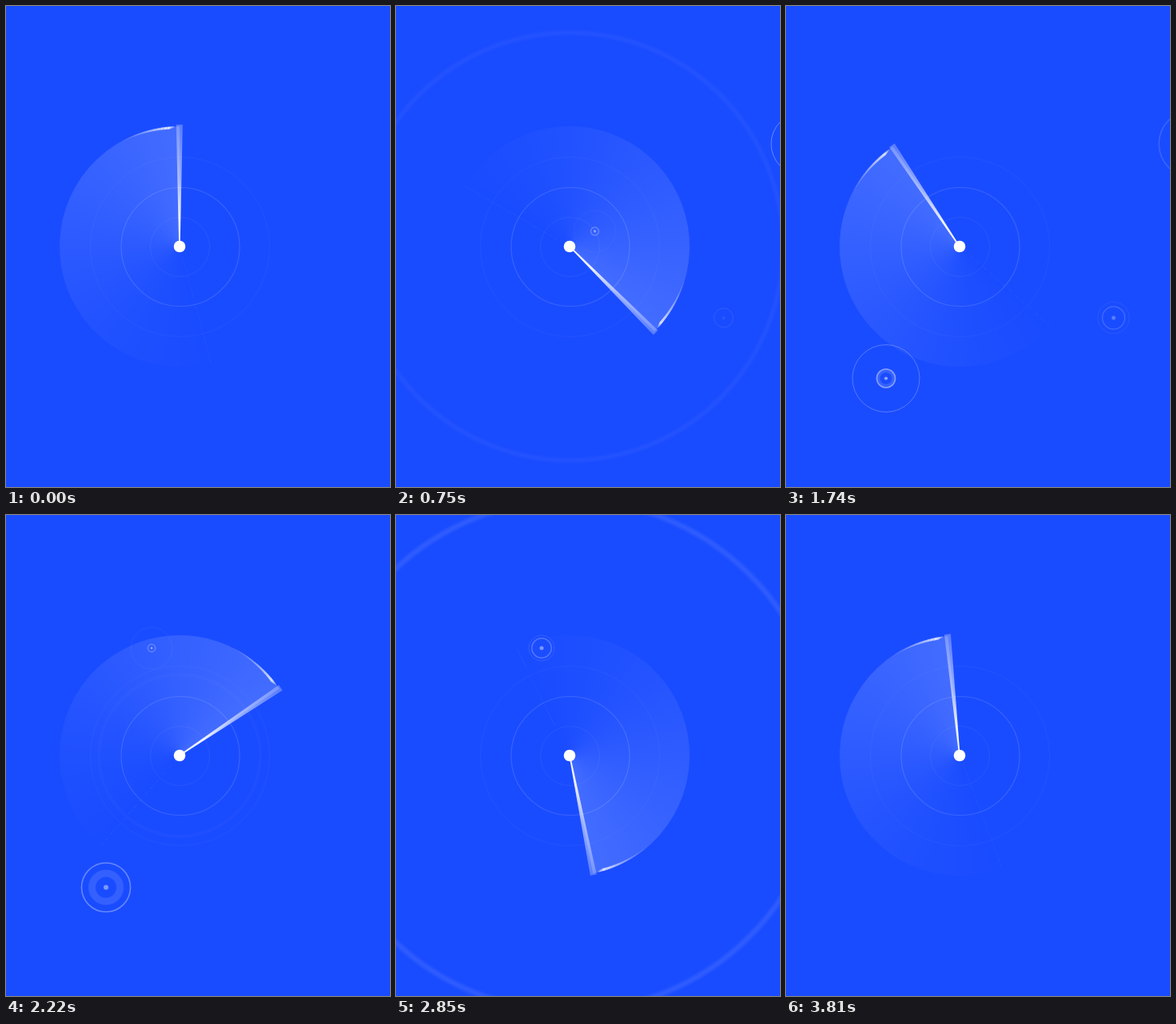
These frames come from a looping animation (480 px wide and 600 px high, 3840 ms). An HTML page with a canvas:

```html
<!DOCTYPE html>
<html lang="en">
<head>
<meta charset="utf-8">
<title>Radar sweep</title>
<style>
html, body { margin: 0; width: 100%; height: 100%; overflow: hidden; background: #1a4cff; }
canvas { display: block; }
</style>
</head>
<body>
<canvas id="stage" width="480" height="600"></canvas>
<script>
const ctx = document.getElementById('stage').getContext('2d');
const LOOP = 3840, TURN = 1920, STEP = 30;
const CX = 217, CY = 300, REACH = 150;
const TAU = Math.PI * 2, DEG = Math.PI / 180;

// Echoes start when the beam passes them; ping = radius, duration, alpha.
const blips = [
  { x: 248.5, y: 281, start: 315, ping: [26, 400, 0.06] },
  { x: 409.5, y: 389, start: 614, ping: [26, 400, 0.16] },
  { x: 508, y: 172, start: 353, ping: [46, 600, 0.33], big: true },
  { x: 125, y: 464.5, start: 1116, ping: [42, 640, 0.36], big: true },
  { x: 182, y: 166, start: 1842, ping: [26, 400, 0.06] }
];

const white = a => `rgba(255,255,255,${Math.max(0, a)})`;
const clamp = v => Math.min(1, Math.max(0, v));
const hump = p => p > 0 && p < 1 ? Math.sin(Math.PI * p) : 0;

function ring(x, y, r, width, alpha) {
  if (r <= 0 || alpha <= 0) return;
  ctx.beginPath();
  ctx.arc(x, y, r, 0, TAU);
  ctx.lineWidth = width;
  ctx.strokeStyle = white(alpha);
  ctx.stroke();
}

function disc(x, y, r, alpha) {
  ctx.beginPath();
  ctx.arc(x, y, r, 0, TAU);
  ctx.fillStyle = white(alpha);
  ctx.fill();
}

// The motion holds for one step twice per loop and catches up later.
function stepTime(ms) {
  const n = Math.floor((ms % LOOP) / STEP);
  const held = (n >= 10 && n < 40) || (n >= 82 && n < 118);
  return (held ? n - 1 : n) * STEP;
}

function drawWave(r, alpha) {
  if (r <= 0 || r > 410) return;
  for (const w of [9, 6, 3]) ring(CX, CY, r, w * (0.4 + r / 500), alpha / 3);
}

function drawWaves(t) {
  drawWave(0.363 * (t + 15), t < 1200 ? 0.035 : 0);
  const r = 0.363 * (t - 1942);
  drawWave(r, 0.025 + 0.065 * clamp((r - 250) / 70));
}

function drawSweep() {
  const span = 195 * DEG;
  const grad = ctx.createConicGradient(-Math.PI / 2 - span, 0, 0);
  const end = span / TAU;
  for (let i = 0; i <= 12; i++) {
    grad.addColorStop(end * i / 12, white(0.18 * Math.pow(i / 12, 1.35)));
  }
  ctx.beginPath();
  ctx.moveTo(0, 0);
  ctx.arc(0, 0, REACH, -Math.PI / 2 - span, -Math.PI / 2);
  ctx.closePath();
  ctx.fillStyle = grad;
  ctx.fill();
}

function drawRim() {
  for (let d = 2.5; d < 33; d += 0.5) {
    const tail = 1 - (d - 2.5) / 30.5;
    const head = clamp((d - 1.5) / 3.5);
    const width = 0.6 + 2.8 * tail * head;
    const a = -Math.PI / 2 - d * DEG;
    ctx.beginPath();
    ctx.arc(0, 0, REACH - width / 2, a - 0.5 * DEG, a);
    ctx.lineWidth = width;
    ctx.strokeStyle = white(head * Math.pow(tail, 1.6));
    ctx.stroke();
  }
}

function drawBeam() {
  const grad = ctx.createLinearGradient(0, 0, 0, -152);
  grad.addColorStop(0, white(1));
  grad.addColorStop(0.25, white(0.9));
  grad.addColorStop(0.55, white(0.55));
  grad.addColorStop(1, white(0.27));
  ctx.beginPath();
  ctx.moveTo(-0.8, 0);
  ctx.lineTo(-4.2, -152);
  ctx.lineTo(3.8, -152);
  ctx.lineTo(0.6, 0);
  ctx.closePath();
  ctx.fillStyle = grad;
  ctx.fill();
}

function drawBlip({ x, y, start, ping, big }, t) {
  const age = t - start;
  if (age <= 0) return;
  const [reach, time, strength] = ping;
  const p = clamp(age / time);
  ring(x, y, reach * (1 - (1 - p) ** 2), 1, strength * hump(age / (time * 1.3)));

  const fade = hump(age / (big ? 1550 : 1350));
  if (!fade) return;
  const inner = 0.0125 * age, outer = 0.025 * (age - 336);
  if (big) {
    ring(x, y, inner * 1.27, 9 * age / 1104, 0.14 * fade);
    ring(x, y, outer * 1.59, 1.6, 0.42 * fade);
  } else {
    ring(x, y, inner, 1.5, 0.32 * fade);
    ring(x, y, outer, 1, 0.13 * fade);
  }
  disc(x, y, Math.min(big ? 3 : 2.5, age * 0.0034), 0.55 * fade);
}

function draw(t) {
  ctx.fillStyle = '#1a4cff';
  ctx.fillRect(0, 0, 480, 600);
  drawWaves(t);
  ring(217.5, 300.5, 37, 1, 0.06);
  ring(218, 300.5, 74, 1.2, 0.13);
  ring(217.5, 300.5, 112, 1, 0.04);

  ctx.save();
  ctx.translate(CX, CY);
  ctx.rotate(t / TURN * TAU);
  drawSweep();
  drawRim();
  drawBeam();
  ctx.restore();

  for (const b of blips) drawBlip(b, t);
  disc(CX, CY, 7.3, 1);
}

const begin = performance.now();
function tick() {
  draw(stepTime(performance.now() - begin));
  requestAnimationFrame(tick);
}
tick();
</script>
</body>
</html>
```
